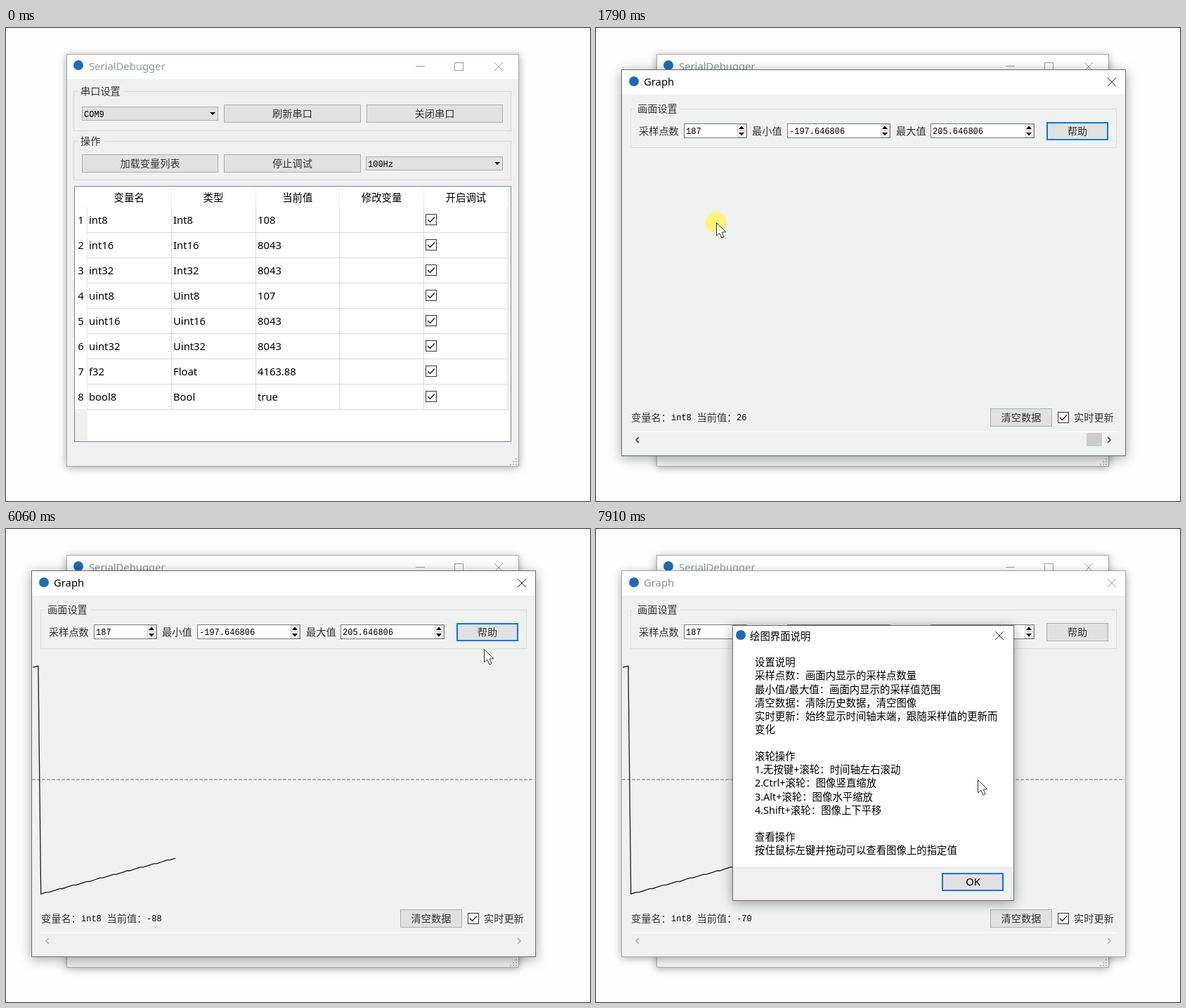
These frames come from a looping animation (831x674 px, 7990 ms). An HTML page with a canvas:

```html
<!DOCTYPE html>
<html lang="zh-CN">
<head>
<meta charset="utf-8">
<title>SerialDebugger</title>
<style>
html, body { margin: 0; width: 100%; height: 100%; overflow: hidden; background: #fefefe; }
canvas { display: block; width: 831px; height: 674px; }
</style>
</head>
<body>
<canvas id="stage" width="831" height="674"></canvas>
<script>
const W = 831, H = 674, LOOP = 7990;
const GRAPH_AT = 1785, RUN_AT = 1865, HELP_AT = 6365;
const screen2d = document.getElementById('stage').getContext('2d');
let ctx = screen2d;

const CJK = '"Noto Sans CJK SC", "Noto Sans CJK", sans-serif';
const FORM = '14.2px ' + CJK;
const HEAD = '14.4px "Noto Sans", ' + CJK;
const UI = '14.8px "Noto Sans", "Open Sans", sans-serif';
const MONO = '12px "Liberation Mono", monospace';
const ICON = '#1b6db8', INK = '#333', BLUE = '#0078d7';
const FACE = [225, 225, 225], EDGE = [173, 173, 173], FOCUS = [0, 120, 215];

// Pointer moves: start, end, destination
const MOVES = [
  [70, 1200, 205, 196], [1290, 1390, 195, 236], [1390, 1640, 171, 277],
  [2650, 3040, 182, 277], [5510, 6050, 680, 171], [6070, 6212, 675, 142],
  [6300, 6440, 671, 163], [6440, 7060, 540, 283], [7780, 7900, 543, 357]
];

// Each variable derives its value from one shared counter
const ROWS = [
  ['int8', 'Int8', n => n + .5 & 255],
  ['int16', 'Int16', Math.floor],
  ['int32', 'Int32', Math.floor],
  ['uint8', 'Uint8', n => n & 255],
  ['uint16', 'Uint16', Math.floor],
  ['uint32', 'Uint32', Math.floor],
  ['f32', 'Float', n => Math.floor(n - 3880.5) + '.88'],
  ['bool8', 'Bool', () => 'true']
];
const HELP = [
  '设置说明', '采样点数：画面内显示的采样点数量', '最小值/最大值：画面内显示的采样值范围',
  '清空数据：清除历史数据，清空图像', '实时更新：始终显示时间轴末端，跟随采样值的更新而', '变化', '',
  '滚轮操作', '1.无按键+滚轮：时间轴左右滚动', '2.Ctrl+滚轮：图像竖直缩放',
  '3.Alt+滚轮：图像水平缩放', '4.Shift+滚轮：图像上下平移', '',
  '查看操作', '按住鼠标左键并拖动可以查看图像上的指定值'
];

function ramp(t, from, to) {
  const k = Math.min(1, Math.max(0, (t - from) / (to - from)));
  return k * k * (3 - 2 * k);
}

function pointerAt(t) {
  return MOVES.reduce(([x, y], [from, to, tx, ty]) => {
    const k = ramp(t, from, to);
    return [x + (tx - x) * k, y + (ty - y) * k];
  }, [232, 624]);
}

function mix(a, b, k) {
  return 'rgb(' + a.map((v, i) => Math.round(v + (b[i] - v) * k)).join() + ')';
}

function rect(x, y, w, h, color) {
  ctx.fillStyle = color;
  ctx.fillRect(x, y, w, h);
}

function box(x, y, w, h, fill, border, lw = 1) {
  rect(x, y, w, h, border);
  rect(x + lw, y + lw, w - 2 * lw, h - 2 * lw, fill);
}

function text(str, x, cy, font, color = '#000', align = 'left') {
  ctx.font = font;
  ctx.fillStyle = color;
  ctx.textAlign = align;
  ctx.fillText(str, x, cy + parseFloat(font) * .37);
}

function path(points, color, lw = 1) {
  ctx.beginPath();
  points.forEach(([x, y]) => ctx.lineTo(x, y));
  ctx.strokeStyle = color;
  ctx.lineWidth = lw;
  ctx.stroke();
}

function shape(points, color) {
  ctx.beginPath();
  points.forEach(([x, y]) => ctx.lineTo(x, y));
  ctx.fillStyle = color;
  ctx.fill();
}

function triangle(x, y, h) {
  shape([[x - 4, y], [x + 4, y], [x, y + h]], '#000');
}

function disc(x, y, r, color) {
  ctx.beginPath();
  ctx.arc(x, y, r, 0, 7);
  ctx.fillStyle = color;
  ctx.fill();
}

function cross(x, y, color) {
  path([[x - 6, y - 6], [x + 6, y + 6]], color);
  path([[x + 6, y - 6], [x - 6, y + 6]], color);
}

function frame(x, y, w, h, border, body, titleH, blur) {
  ctx.save();
  ctx.shadowColor = 'rgba(0,0,0,.36)';
  ctx.shadowBlur = blur;
  ctx.shadowOffsetY = blur / 5;
  rect(x, y, w, h, border);
  ctx.restore();
  box(x, y, w, h, body, border);
  rect(x + 1, y + 1, w - 2, titleH, '#fff');
}

function group(x, y, w, h, label, bg) {
  ctx.strokeStyle = '#dcdcdc';
  ctx.lineWidth = 1;
  ctx.strokeRect(x + .5, y + .5, w - 1, h - 1);
  rect(x + 7, y - 3, label.length * 14.2 + 7, 8, bg);
  text(label, x + 10, y, FORM, INK);
}

function button(x, y, w, h, label, fill = mix(FACE, FACE, 0), border = mix(EDGE, EDGE, 0), lw = 1) {
  box(x, y, w, h, fill, border, lw);
  text(label, x + w / 2, y + h / 2, FORM, INK, 'center');
}

function combo(x, y, w, label) {
  box(x, y, w, 20, '#e1e1e1', '#adadad');
  text(label, x + 3, y + 10.5, MONO);
  triangle(x + w - 8, y + 8, 4);
}

function checkbox(x, y) {
  box(x, y, 16, 16, '#fff', '#333');
  path([[x + 3, y + 8], [x + 6.5, y + 11.5], [x + 13, y + 4.5]], '#222', 1.5);
}

function spin(x, w, label) {
  const ax = x + w - 8;
  box(x, 136, w, 21, '#fff', '#7a7a7a');
  text(label, x + 3, 147, MONO);
  box(ax - 6, 137, 13, 10, '#f0f0f0', '#d0d0d0');
  box(ax - 6, 146, 13, 10, '#f0f0f0', '#d0d0d0');
  triangle(ax, 144, -4.5);
  triangle(ax, 149, 4.5);
}

function table(t, [px, py]) {
  box(97, 225, 622, 365, '#fff', '#828790');
  rect(98, 543, 18, 46, '#f0f0f0');
  if (px > 115 && px < 235 && py > 226 && py < 255) rect(115, 226, 120, 29, '#d9ebf9');
  ['变量名', '类型', '当前值', '修改变量', '开启调试'].forEach((label, i) => {
    const x = Math.round(234.6 + i * 119.9);
    text(label, 175.2 + i * 119.8, 242, HEAD, '#000', 'center');
    rect(x, 226, 1, 29, '#ececec');
    rect(x, 255, 1, 288, '#d8d8d8');
  });
  rect(115, 255, 1, 288, '#e8e8e8');
  ROWS.forEach(([name, type, value], i) => {
    const y = 273.5 + i * 36;
    rect(115, 291 + i * 36, 600, 1, '#d8d8d8');
    text(i + 1, 106.5, y, UI, '#000', 'center');
    text(name, 118, y, UI);
    text(type, 238, y, UI);
    text(value(8043.5 + t / 100), 358, y, UI);
    checkbox(597, 265 + i * 36);
  });
}

function mainWindow(t, pointer) {
  const active = t >= 1630 && t < GRAPH_AT;
  const ink = active ? '#000' : '#999';
  frame(86, 37, 644, 588, active ? '#6e6e6e' : '#aaa', '#f0f0f0', 35, active ? 16 : 11);
  disc(103, 53, 7, ICON);
  text('SerialDebugger', 118, 55, UI, active ? '#000' : '#8f9a94');
  rect(583, 54, 13, 1, ink);
  ctx.strokeStyle = ink;
  ctx.lineWidth = 1;
  ctx.strokeRect(638.5, 49.5, 12, 11);
  cross(701, 55, ink);

  group(96, 90, 623, 57, '串口设置', '#f0f0f0');
  combo(108, 112, 194, 'COM9');
  button(310, 109, 195, 26, '刷新串口');
  button(513, 109, 194, 26, '关闭串口');
  group(96, 161, 623, 56, '操作', '#f0f0f0');
  const hover = ramp(t, 1100, 1180) * (1 - ramp(t, 1330, 1500));
  button(108, 180, 194, 26, '加载变量列表', mix(FACE, [229, 241, 251], hover), mix(EDGE, FOCUS, hover));
  button(310, 180, 195, 26, '停止调试');
  combo(512, 183, 195, '100Hz');
  table(t, pointer);
  for (let i = 0; i < 3; i++)
    for (let j = 0; j <= i; j++) rect(725 - j * 4, 613 + i * 4, 2, 2, '#bfbfbf');
}

// Saw-tooth signal that wraps from 127 to -128 at the third sample
function sample(i) {
  return i < 3 ? 125.4 + i * .8 : -128 + Math.floor((i - 3) * .8 + .4 + 1e-6);
}

// Opening the help dialog stalls sampling briefly
function sampleCount(t) {
  return Math.floor((t - 1775 - (t > HELP_AT ? 80 : 0)) * .0124);
}

function plot(count) {
  ctx.save();
  ctx.setLineDash([5, 2]);
  path([[37, 357], [752, 357]], '#b0b0b0', 2);
  ctx.restore();
  const points = Array.from({ length: count + 1 }, (_, i) => [38.2 + i * 3.83, 357 - 1.2745 * sample(i)]);
  path(points, '#1a1a1a', 1.3);
}

function chevron(x, dir, color) {
  path([[x + 2 * dir, 583], [x - 2 * dir, 587], [x + 2 * dir, 591]], color, 1.8);
}

function graphWindow(t) {
  const active = t < HELP_AT, running = t >= RUN_AT, bg = '#f0f1f1';
  const count = sampleCount(t);
  frame(36, 59, 718, 551, active ? '#6e6e6e' : '#aaa', bg, 35, active ? 16 : 11);
  disc(54, 76, 7, ICON);
  text('Graph', 68, 77, UI, active ? '#000' : '#8f8f8f');
  cross(734, 77, active ? '#222' : '#999');

  group(49, 115, 692, 56, '画面设置', bg);
  text('采样点数', 61, 147, FORM, INK);
  spin(125, 90, '187');
  text('最小值', 222, 147, FORM, INK);
  spin(272, 147, '-197.646806');
  text('最大值', 427, 147, FORM, INK);
  spin(476, 148, '205.646806');
  const hover = ramp(t, 6130, 6212) * (1 - ramp(t, 6370, 6680));
  button(641, 134, 88, 26, '帮助', mix(FACE, [218, 233, 246], hover),
    mix(FOCUS, EDGE, ramp(t, 6370, 6560)), t < 6500 ? 2 : 1);

  if (running) plot(count);
  text('变量名：', 50, 555, FORM, INK);
  text('int8', 107, 555, MONO);
  text('当前值：', 143.5, 555, FORM, INK);
  text(running ? Math.floor(sample(count)) : 26, 200, 555, MONO);
  button(561, 542, 88, 26, '清空数据');
  checkbox(657, 547);
  text('实时更新', 680, 555, FORM, INK);

  rect(50, 575, 691, 1, '#fff');
  const ink = running ? '#b8b8b8' : '#555';
  chevron(59, 1, ink);
  chevron(730, -1, ink);
  if (!running) rect(698, 577, 22, 19, '#cdcdcd');
}

// The dialog is drawn once so that it can fade as a single layer
function renderDialog() {
  const layer = document.createElement('canvas');
  layer.width = W;
  layer.height = H;
  ctx = layer.getContext('2d');
  frame(194, 137, 401, 393, '#6e6e6e', '#f0f0f0', 344, 16);
  rect(195, 482, 399, 1, '#dfdfdf');
  disc(206, 151, 7, ICON);
  text('绘图界面说明', 219, 153, HEAD);
  cross(574, 152, '#222');
  HELP.forEach((line, i) => text(line, 226, 190 + i * 19.12, HEAD));
  box(492, 490, 88, 26, '#e1e1e1', BLUE, 2);
  text('OK', 536.5, 503, UI, '#000', 'center');
  ctx = screen2d;
  return layer;
}

function helpDialog(t) {
  const open = ramp(t, 6360, 6500), scale = .965 + .035 * open;
  ctx.save();
  ctx.globalAlpha = .5 + .5 * open;
  ctx.translate(394, 333.5);
  ctx.scale(scale, scale);
  ctx.drawImage(dialog, -394, -333.5);
  ctx.restore();
}

function drawPointer(t, [x, y]) {
  if (t < 70) return;
  if ((t >= 1630 && t < 1940) || (t >= 6200 && t < 6360)) disc(x, y, 15, 'rgba(255,247,80,.75)');
  const arrow = [[0, 0], [0, 18.5], [4.3, 14.8], [7.4, 21.6], [10.6, 20.2], [7.6, 13.6], [13.3, 13.2], [0, 0]]
    .map(([dx, dy]) => [x + .5 + dx, y + .5 + dy]);
  shape(arrow, '#fff');
  path(arrow, '#333');
}

function draw(t) {
  const pointer = pointerAt(t);
  rect(0, 0, W, H, '#fefefe');
  mainWindow(t, pointer);
  if (t >= GRAPH_AT) graphWindow(t);
  if (t >= HELP_AT) helpDialog(t);
  drawPointer(t, pointer);
}

const dialog = renderDialog();
const begin = performance.now();
function tick() {
  draw((performance.now() - begin) % LOOP);
  requestAnimationFrame(tick);
}
tick();
</script>
</body>
</html>
```
